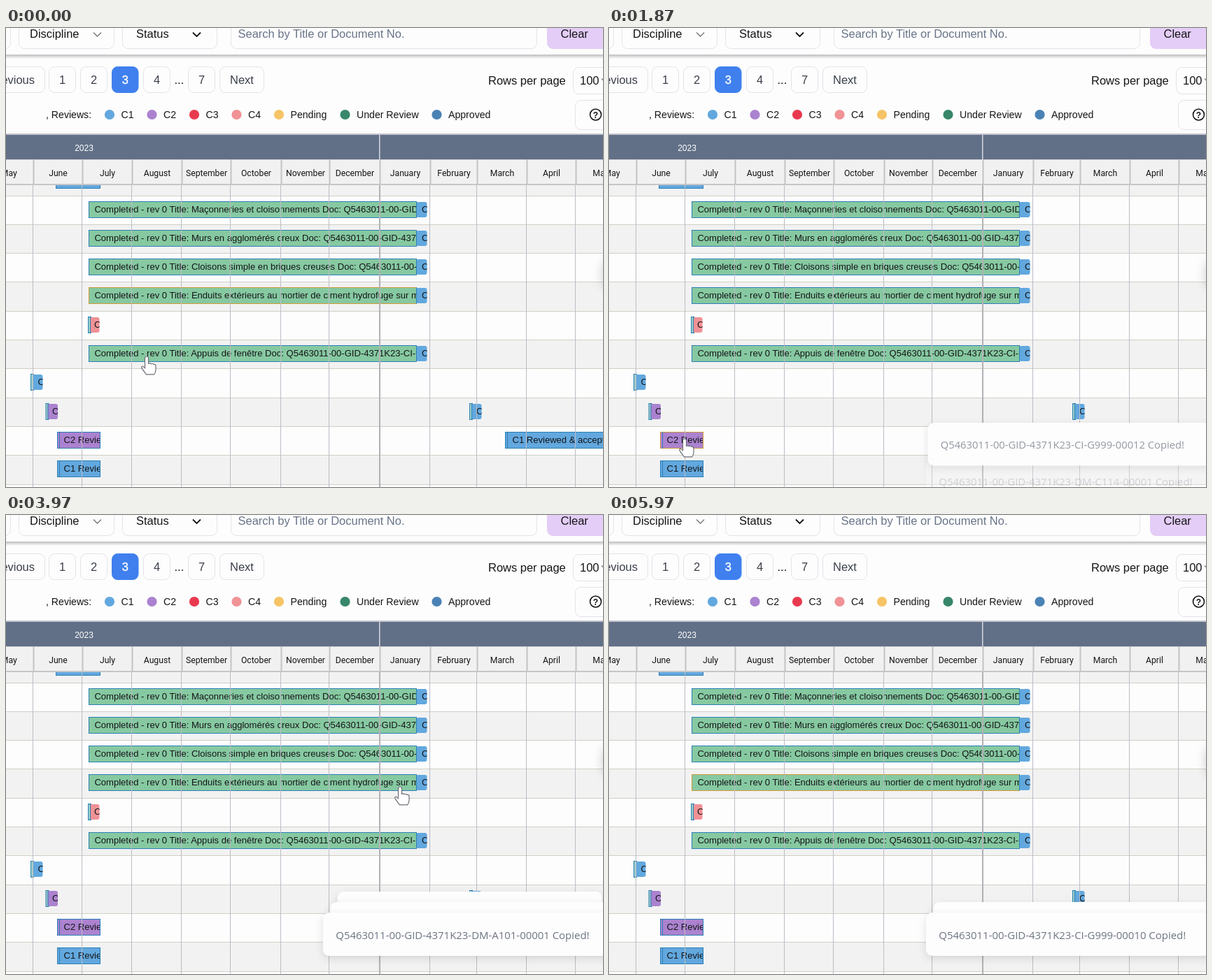
Write an HTML page that moves like this. It is 853 px wide and 657 px high and loops after 6.13 s.

```html
<!DOCTYPE html>
<html lang="en">
<head>
<meta charset="utf-8">
<style>
  html, body { margin: 0; width: 100%; height: 100%; overflow: hidden; background: #fdfdfd; }
  svg { display: block; }
  text { font-family: "Liberation Sans", Arial, sans-serif; white-space: pre; }
  .toast text { font-family: "Open Sans", "Noto Sans", sans-serif; }
</style>
</head>
<body>
<svg id="stage" width="853" height="657" viewBox="0 0 853 657">
  <defs>
    <filter id="shadow" x="-10%" y="-50%" width="120%" height="220%">
      <feDropShadow dx="0" dy="4" stdDeviation="6" flood-color="#000" flood-opacity=".12"/>
    </filter>
    <filter id="blur" x="-200%" y="-100%" width="500%" height="300%"><feGaussianBlur stdDeviation="8"/></filter>
    <linearGradient id="fade" x2="0" y2="1">
      <stop stop-color="#bdbdc0"/><stop offset="1" stop-color="#fdfdfd"/>
    </linearGradient>
  </defs>
</svg>
<script>
const LOOP = 6130;
const ROW_TOP = 240, ROW_H = 41.3, BAR_H = 24;
const BLUE = '#62a8de', PURPLE = '#ab82cf', PINK = '#f09296', GREEN = '#86c9a1';
const EDGE = '#2b7fb6', SELECTED = '#d09a3a', LINE = '#e4e2ea', INK = '#151518';
const stage = document.getElementById('stage');

function add(parent, tag, attrs = {}, content) {
  const node = document.createElementNS('http://www.w3.org/2000/svg', tag);
  for (const key in attrs) node.setAttribute(key, attrs[key]);
  if (content !== undefined) node.textContent = content;
  parent.appendChild(node);
  return node;
}
const rect = (parent, x, y, width, height, fill, more) =>
  add(parent, 'rect', { x, y, width, height, fill, ...more });
const label = (parent, x, y, size, content, fill = INK, more) =>
  add(parent, 'text', { x, y, 'font-size': size, fill, ...more }, content);
const line = (parent, d, stroke, width = 1) =>
  add(parent, 'path', { d, stroke, 'stroke-width': width, fill: 'none' });
const middle = { 'text-anchor': 'middle' };
const box = (x, y, width, height, fill = '#fdfdfd', stroke = LINE) =>
  rect(stage, x + .5, y + .5, width - 1, height - 1, fill, { rx: 8, stroke });

function drawToolbar() {
  box(-40, -20, 47, 50);
  box(18, -20, 137, 50);
  box(166, -20, 136, 50);
  box(321, -20, 438, 50);
  box(773, -20, 100, 50, '#e4cdf7', '#e4cdf7');
  label(stage, 34, 14, 16.48, 'Discipline');
  label(stage, 186, 14, 16.48, 'Status');
  label(stage, 331.5, 14, 16.48, 'Search by Title or Document No.', '#687488');
  label(stage, 792.5, 14, 16.48, 'Clear');
  line(stage, 'M125 6.5l5.5 5.5 5.5-5.5', '#777', 1.4);
  line(stage, 'M267 6.5l5.5 5.5 5.5-5.5', '#111', 1.8);
  rect(stage, 0, 38, 853, 6, 'url(#fade)');
}

function drawPager() {
  const button = (x, width, content) => {
    const active = content === '3';
    box(x, 55, width, 38, active ? '#3f80ee' : '#fdfdfd', active ? '#3f80ee' : LINE);
    label(stage, x + width / 2, 79.5, 16.48, content, active ? '#fff' : '#3a3f4a',
      active ? { ...middle, stroke: '#fff', 'stroke-width': .4 } : middle);
  };
  box(-50, 55, 106, 38);
  label(stage, 41, 79.5, 16.48, 'Previous', '#3a3f4a', { 'text-anchor': 'end' });
  button(61, 39, '1');
  button(106, 39, '2');
  button(151, 38.5, '3');
  button(196, 39, '4');
  label(stage, 240.5, 79.5, 16.48, '...');
  button(260, 39, '7');
  button(305, 64, 'Next');
  label(stage, 689, 81, 16.48, 'Rows per page');
  box(810, 56, 80, 39);
  label(stage, 820, 81, 16.48, '100');
  line(stage, 'M851 72.5l4 4', '#777', 1.4);
}

function drawLegend() {
  label(stage, 57, 129, 14.12, ', Reviews:');
  [[148, BLUE, 'C1'], [208.5, PURPLE, 'C2'], [269, '#e9394f', 'C3'], [329.5, PINK, 'C4'],
   [390, '#f6c466', 'Pending'], [484.5, '#38876a', 'Under Review'], [615.5, '#4a82b5', 'Approved']
  ].forEach(([cx, fill, name]) => {
    add(stage, 'circle', { cx, cy: 124, r: 7.1, fill });
    label(stage, cx + 16.5, 129, 14.12, name);
  });
  box(813, 103, 70, 43);
  add(stage, 'circle', { cx: 842.5, cy: 124, r: 8, fill: 'none', stroke: INK, 'stroke-width': 1.6 });
  label(stage, 842.5, 128.5, 12, '?', INK, { ...middle, 'font-weight': 'bold' });
}

const columns = [38.5, 108.5, 179.5, 250.5, 320.5, 392.5, 461.5, 533.5, 605.5, 672.5, 743.5, 813.5];
const months = ['May', 'June', 'July', 'August', 'September', 'October', 'November',
  'December', 'January', 'February', 'March', 'April', 'May'];

function drawHeader() {
  rect(stage, 0, 151, 853, 37, '#617087');
  rect(stage, 0, 151, 853, 2, '#c4c3cc');
  rect(stage, 533, 153, 1.5, 35, '#d8d8dc');
  label(stage, 111.5, 175.5, 12, '2023', '#fff', middle);
  rect(stage, 0, 188, 853, 37, '#f1f1f1');
  line(stage, 'M0 188.5H853', '#d2d2d4');
  line(stage, 'M0 224H853', '#c6c6c8', 2);
  columns.forEach(x => line(stage, `M${x + 1} 188V224`, '#c3c3c5', 2));
  months.forEach((name, i) => {
    const from = i ? columns[i - 1] : -32, to = columns[i] || 884;
    label(stage, (from + to) / 2 + 1, 211.5, 12.2, name, INK,
      { ...middle, style: 'font-family: Roboto, sans-serif' });
  });
}

const bars = [];
const rowY = row => Math.round(ROW_TOP + ROW_H * row + 7.5);

function clippedText(x, y, width, content, textX) {
  const view = add(chart, 'svg', { x, y, width, height: BAR_H, overflow: 'hidden' });
  label(view, textX - x, 16.3, 13.05, content);
}
function bar(row, x, width, fill) {
  const y = rowY(row);
  const shape = rect(chart, x + .5, y + .5, width - 1, BAR_H - 1, fill, { stroke: EDGE });
  bars.push({ x, y, width, shape });
}
function chip(row, x, width, fill, content, textX) {
  const y = rowY(row);
  rect(chart, x, y + 1, width, BAR_H - 2, fill, { rx: 3 });
  line(chart, `M${x + .5} ${y}v${BAR_H}`, EDGE);
  clippedText(x, y, width, content, textX);
}
function completed(row, title) {
  bar(row, 118, 469, GREEN);
  clippedText(118, rowY(row), 468, `Completed - rev 0 Title: ${title}`, 126.4);
  chip(row, 586, 15.5, BLUE, 'C1', 594);
}
function review(row, x, width, fill, content, textX) {
  const wide = width > 20;
  bar(row, x, wide ? width : 5, wide ? fill : '#9fd0c5');
  chip(row, x + 3, width - (wide ? 4 : 3.5), fill, content, textX);
}

let chart;
function drawChart() {
  chart = add(stage, 'svg', { x: 0, y: 0, width: 853, height: 657 });
  rect(chart, 0, 225, 853, 15, '#f2f2f2');
  for (let row = 0; row < 11; row++) {
    const y = ROW_TOP + ROW_H * row;
    if (row % 2) rect(chart, 0, y, 853, ROW_H, '#f2f2f2');
    line(chart, `M0 ${Math.floor(y) + .5}H853`, '#cfcfc6');
  }
  rect(chart, 71, 225, 64, 5, BLUE);
  line(chart, 'M71.5 225V229.5H134.5V225', EDGE);
  completed(0, 'Maçonneries et cloisonnements Doc: Q5463011-00-GID-4371K23');
  completed(1, 'Murs en agglomérés creux Doc: Q5463011-00-GID-4371K23');
  completed(2, 'Cloisons simple en briques creuses Doc: Q5463011-00-GID');
  completed(3, 'Enduits extérieurs au mortier de ciment hydrofuge sur murs');
  review(4, 117, 17, PINK, 'C4', 126);
  completed(5, 'Appuis de fenêtre Doc: Q5463011-00-GID-4371K23-CI-G999');
  review(6, 35, 18, BLUE, 'C1', 45.5);
  review(7, 56.5, 18, PURPLE, 'C2', 66);
  review(7, 662, 18, BLUE, 'C1', 672);
  review(8, 73, 62, PURPLE, 'C2 Reviewed', 82.5);
  review(8, 713, 200, BLUE, 'C1 Reviewed & accepted', 723.5);
  review(9, 73, 62, BLUE, 'C1 Reviewed', 82.5);
  columns.forEach((x, i) => i === 7
    ? line(chart, 'M534 225V657', '#b2b2b6', 2)
    : line(chart, `M${x} 225V657`, '#bcbcc6'));
  add(stage, 'ellipse', { cx: 864, cy: 352, rx: 12, ry: 22, fill: '#000', opacity: .18, filter: 'url(#blur)' });
}

drawToolbar();
drawPager();
drawLegend();
drawChart();
drawHeader();

// Each click raises a toast; some also select a bar.
const clicks = [
  { at: 330, bar: 5, code: 'CI-G999-00012', grabEnd: 650 },
  { at: 1797, bar: 9, code: 'DM-C114-00001', grabEnd: 2250 },
  { at: 2973, bar: null, code: 'DM-A101-00001', grabEnd: 3350 },
  { at: 4120, bar: 3, code: 'CI-G999-00010', grabEnd: 5000 }
];
const toasts = clicks.map(({ at, code }) => {
  const group = add(stage, 'g', { class: 'toast' });
  rect(group, 453, 569, 419, 62, '#fdfdfe', { rx: 9, filter: 'url(#shadow)' });
  const text = label(group, 471.3, 606.7, 14.93, `Q5463011-00-GID-4371K23-${code} Copied!`, '#6d7480');
  return { at, group, text };
});

const cursor = add(stage, 'g', { fill: '#fff', stroke: '#6c6f78', 'stroke-width': 1.2, 'stroke-linejoin': 'round' });
const pointers = {
  arrow: 'M0 0V17l4-3.5 3 7 3-1.3-3-6.7h5.5z',
  hand: 'M-2.5 1.5q2.5-3 5 0v9q2-1.5 4 .3q2-.8 3.5.6q3-.5 3 2.5v5q0 4-2.5 7h-11q-4-5-6.5-9q-1-3 1.5-2.5l3 2.5z',
  move: 'M0-13l6 6h-4v5h5v-4l6 6-6 6v-4h-5v5h4l-6 6-6-6h4v-5h-5v4l-6-6 6-6v4h5v-5h-4z'
};
for (const kind in pointers) pointers[kind] = add(cursor, 'path', { d: pointers[kind] });

// Cursor stops as [time, x, y].
const path = [
  [0, 201, 470], [600, 201, 470], [1080, 118, 540], [1300, 118, 541], [1620, 108, 588],
  [2250, 108, 588], [2780, 45, 510], [3330, 45, 510], [3920, 563, 389], [5000, 563, 390], [5570, 610, -30]
];

const clamp = v => Math.max(0, Math.min(1, v));

// The CSS "ease" curve, solved by bisection.
function ease(x) {
  if (x <= 0 || x >= 1) return clamp(x);
  const bezier = (a, b, s) => 3 * a * s * (1 - s) ** 2 + 3 * b * s * s * (1 - s) + s ** 3;
  let low = 0, high = 1;
  for (let i = 0; i < 24; i++) {
    const mid = (low + high) / 2;
    if (bezier(.25, .25, mid) < x) low = mid; else high = mid;
  }
  return bezier(.1, 1, low);
}

function cursorAt(t) {
  const i = path.findIndex(stop => stop[0] > t);
  if (i < 0) return [610, -50];
  const [t0, x0, y0] = path[i - 1], [t1, x1, y1] = path[i];
  const u = (t - t0) / (t1 - t0), s = u * u * (3 - 2 * u);
  return [x0 + (x1 - x0) * s, y0 + (y1 - y0) * s];
}

function render(t) {
  const last = clicks.filter(c => c.at <= t).pop();
  const selected = last ? last.bar : 3;
  bars.forEach((b, i) => b.shape.setAttribute('stroke', i === selected ? SELECTED : EDGE));

  toasts.forEach(({ at, group, text }, i) => {
    const shown = ease((t - at) / 400);
    const depth = toasts.slice(i + 1).reduce((sum, next) => sum + ease((t - next.at) / 400), 0);
    const gone = ease((t - at - 4000) / 190);
    const opacity = shown * clamp(3 - depth) * (1 - gone);
    const scale = 1 - .05 * depth;
    const y = 600 - 16.5 * depth + 66 * (1 - shown) + 25 * ease((t - at - 4000) / 500);
    group.setAttribute('display', opacity > 0 ? 'inline' : 'none');
    group.setAttribute('opacity', opacity);
    group.setAttribute('transform', `translate(662.5 ${y}) scale(${scale}) translate(-662.5 -600)`);
    text.setAttribute('opacity', clamp(1 - depth));
  });

  const [x, y] = cursorAt(t);
  const grabbing = clicks.some(c => t >= c.at + 100 && t < c.grabEnd);
  const hovering = bars.some(b => x >= b.x && x <= b.x + b.width && y >= b.y && y <= b.y + BAR_H);
  const kind = grabbing ? 'move' : hovering ? 'hand' : 'arrow';
  for (const name in pointers) pointers[name].setAttribute('display', name === kind ? 'inline' : 'none');
  cursor.setAttribute('transform', `translate(${x} ${y})`);
}

const start = performance.now();
function tick() {
  render((performance.now() - start) % LOOP);
  requestAnimationFrame(tick);
}
tick();
</script>
</body>
</html>
```
